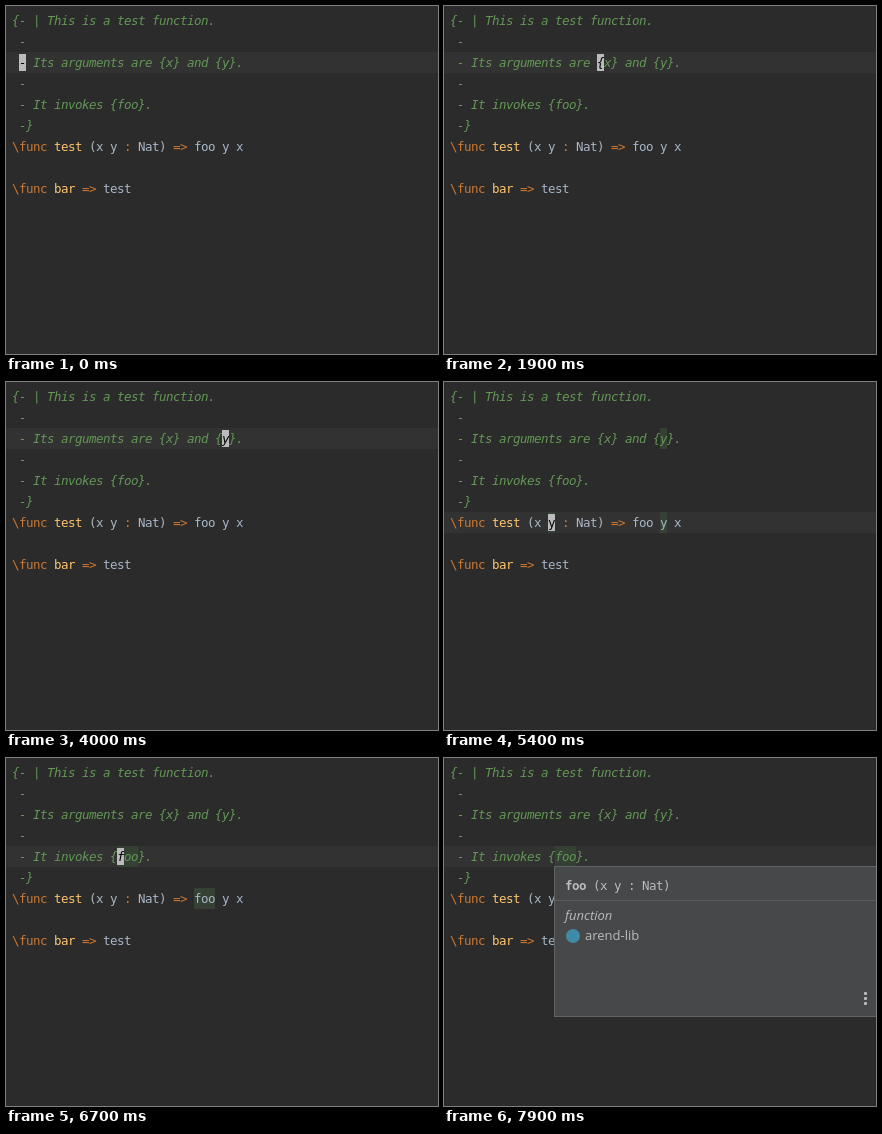
Write an HTML page that moves like this. It is 432 by 348 pixels and loops after 8 s.

```html
<!DOCTYPE html>
<html lang="en">
<head>
<meta charset="utf-8">
<title>Doc comment references</title>
<style>
  html, body { margin: 0; width: 100%; height: 100%; overflow: hidden; background: #2b2b2b; }
  #stage { position: relative; width: 432px; height: 348px; overflow: hidden; background: #2b2b2b; color: #a9b7c6; }
  #stage, .mono { font: 12.5px/21px "DejaVu Sans Mono", "Noto Sans Mono", monospace; letter-spacing: calc(7px - .602em); font-variant-ligatures: none; }
  #stage div { position: absolute; white-space: pre; }
  #row { left: 0; width: 100%; height: 21px; background: #323232; }
  .mark { height: 21px; background: #344134; }
  .line { left: 6px; height: 21px; }
  .doc { color: #629755; font-style: italic; }
  .key { color: #cc7832; }
  .name { color: #ffc66d; }
  #caret { width: 7px; height: 17px; line-height: 17px; background: #bbb; color: #000; }
  #popup { left: 110px; top: 108px; width: 340px; height: 149px; border: 1px solid #616365; background: #46484a; color: #bbb; }
  #popup .mono { left: 10px; top: 8px; }
  #popup .rule { left: 0; top: 33px; width: 100%; height: 1px; background: #5b5d5f; }
  #popup .sans { font: 13px/20px "Open Sans", "Noto Sans", sans-serif; letter-spacing: 0; }
  #popup .icon { left: 11px; top: 62px; width: 14px; height: 14px; border-radius: 50%; background: #3f8ba8; }
  #popup .dot { left: 309px; width: 3px; height: 3px; border-radius: 1px; background: #bbb; }
</style>
</head>
<body>
<div id="stage">
  <div id="row"></div>
  <div id="marks"></div>
  <div id="text"></div>
  <div id="caret"></div>
  <div id="popup">
    <div class="mono"><b>foo</b> (x y : Nat)</div>
    <div class="rule"></div>
    <div class="sans" style="left:10px;top:38px"><i>function</i></div>
    <div class="icon"></div>
    <div class="sans" style="left:30px;top:58px">arend-lib</div>
    <div class="dot" style="top:125px"></div>
    <div class="dot" style="top:130px"></div>
    <div class="dot" style="top:135px"></div>
  </div>
</div>
<script>
const LOOP = 8000, CELL = 7, LEFT = 6, TOP = 4, PITCH = 21;
const $ = id => document.getElementById(id);
const lines = [
  '{- | This is a test function.',
  ' -',
  ' - Its arguments are {x} and {y}.',
  ' -',
  ' - It invokes {foo}.',
  ' -}',
  '\\func test (x y : Nat) => foo y x',
  '',
  '\\func bar => test'
];
const isDoc = line => line < 6;

// Highlighted cells for each symbol: [line, column]
const usages = {
  x: [[2, 22], [6, 12], [6, 32]],
  y: [[2, 30], [6, 14], [6, 30]],
  foo: [[4, 15], [6, 26]]
};

// [time, line, column, highlighted symbol, caret hidden, popup open]
const steps = [
  [0, 2, 1], [400, 2, 2], [500, 2, 3], [800, 2, 7], [1700, 2, 17],
  [1900, 2, 21], [2300, 2, 22], [2600, 2, 22, 'x'], [3100, 2, 23, 'x'],
  [3400, 2, 25, 'x'], [3700, 2, 29], [4000, 2, 30], [4300, 2, 30, 'y'],
  [4900, 2, 30, 'y', true], [5400, 6, 14, 'y'], [5800, 5, 2, 'y'],
  [6100, 4, 14], [6400, 4, 15], [6700, 4, 15, 'foo'],
  [7300, 4, 15, 'foo', true, true], [7400, 4, 15, 'foo', false, true],
  [7900, 4, 15, 'foo', true, true]
];

function add(parent, className, line, col) {
  const el = document.createElement('div');
  el.className = className;
  el.style.left = LEFT + col * CELL + 'px';
  el.style.top = TOP + line * PITCH + 'px';
  return parent.appendChild(el);
}

const color = code => code
  .replace(/\\func (\w+)/, '<span class="key">\\func</span> <span class="name">$1</span>')
  .replace('=>', '<span class="key">=&gt;</span>')
  .replace(' : ', ' <span class="key">:</span> ');

lines.forEach((code, i) => {
  const el = add($('text'), isDoc(i) ? 'line doc' : 'line', i, 0);
  if (isDoc(i)) el.textContent = code;
  else el.innerHTML = color(code);
});

const marks = [];
for (const [symbol, cells] of Object.entries(usages)) {
  for (const [line, col] of cells) {
    const el = add($('marks'), 'mark', line, col);
    el.style.width = symbol.length * CELL + 'px';
    marks.push({ symbol, el });
  }
}

const show = (el, on) => { el.style.visibility = on ? 'visible' : 'hidden'; };

let current;
function draw() {
  const time = performance.now() % LOOP;
  const step = steps.findLast(s => s[0] <= time);
  if (step !== current) {
    current = step;
    const [, line, col, symbol, hidden, popup] = step;
    const caret = $('caret');
    $('row').style.top = TOP + line * PITCH + 'px';
    caret.style.left = LEFT + col * CELL + 'px';
    caret.style.top = TOP + 2 + line * PITCH + 'px';
    caret.style.fontStyle = isDoc(line) ? 'italic' : 'normal';
    caret.textContent = lines[line][col];
    show(caret, !hidden);
    show($('popup'), popup);
    marks.forEach(m => show(m.el, m.symbol === symbol));
  }
  requestAnimationFrame(draw);
}
draw();
</script>
</body>
</html>
```
